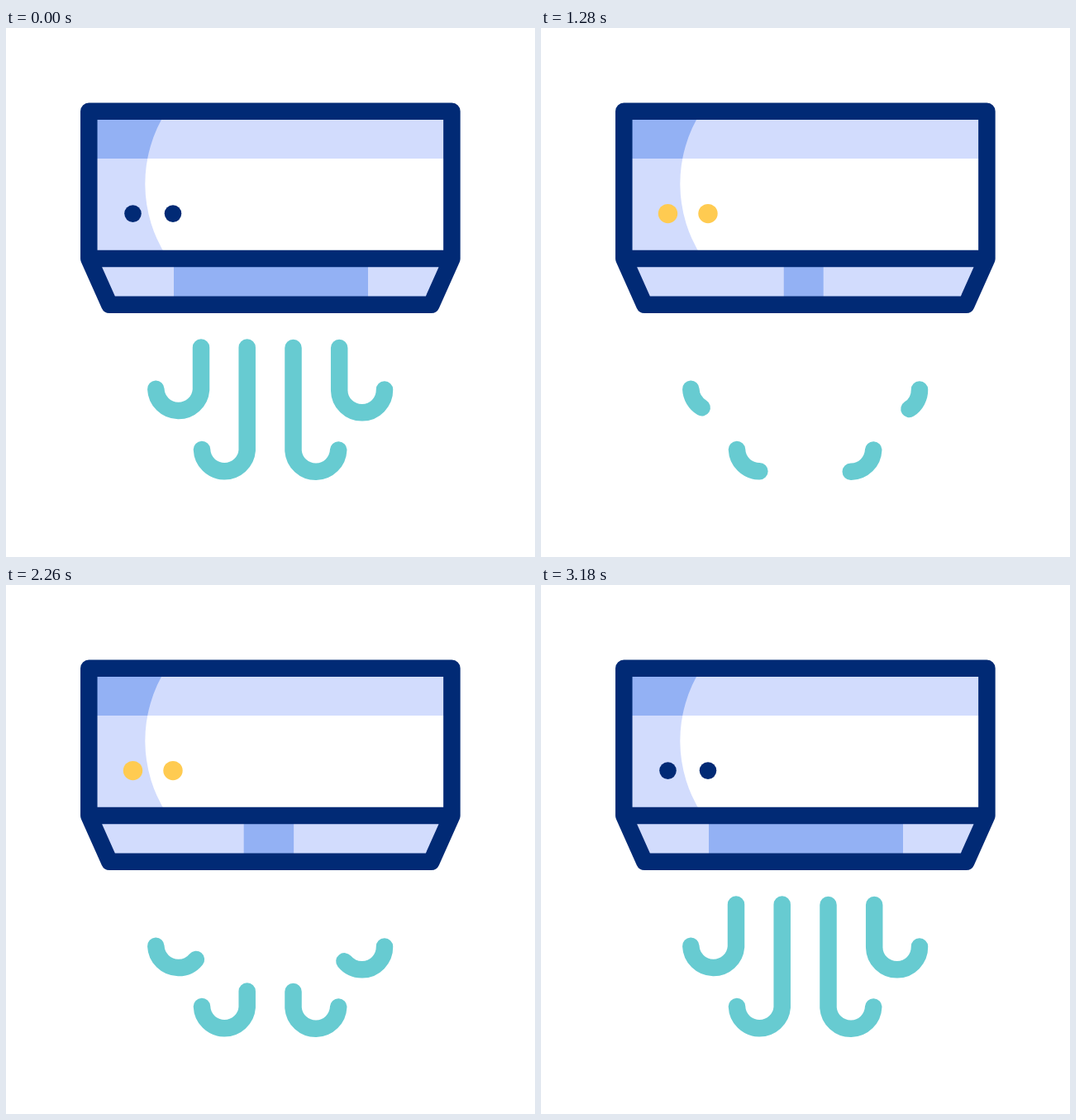
These frames come from a looping animation (640 px wide and 640 px high, 3.6 s). An HTML page:

```html
<!DOCTYPE html>
<html lang="en">
<head>
<meta charset="utf-8">
<title>Air conditioner</title>
<style>
  html, body { margin: 0; height: 100%; overflow: hidden; background: #fff; }
  svg { display: block; width: 100vw; height: 100vh; }
  .light { fill: #d2dcfd; }
  .mid { fill: #93b1f4; }
  .frame { fill: none; stroke: #012a75; stroke-width: 20.5; stroke-linejoin: round; }
  .air { fill: none; stroke: #67cbd1; stroke-width: 20.5; stroke-linecap: round; stroke-dasharray: 1 1; }
</style>
</head>
<body>
<svg viewBox="0 0 640 640">
  <defs>
    <clipPath id="panel"><path d="M100 100H540V279H100Z"/></clipPath>
    <clipPath id="band"><path d="M100 100H540V158H100Z"/></clipPath>
  </defs>

  <path class="light" d="M100 100H540V158H100Z"/>
  <g clip-path="url(#panel)">
    <path id="shade" class="light" d="M100 100H194.5A162.5 162.5 0 0 0 195.9 279H100Z"/>
  </g>
  <use href="#shade" id="corner" clip-path="url(#band)"/>
  <path class="mid" clip-path="url(#band)" d="M100 100H194.5A162.5 162.5 0 0 0 195.9 279H100Z"/>

  <path class="light" d="M100.3 279H539.4L514.5 334.7H125.2Z"/>
  <rect id="vent" class="mid" y="280" height="54"/>
  <path class="frame" d="M100.3 100.7H539.4V279L514.5 334.7H125.2L100.3 279ZM100.3 279H539.4"/>

  <g id="lamps"><circle cx="153.5" cy="224.6"/><circle cx="202" cy="224.6"/></g>

  <g class="air">
    <path pathLength="1" d="M236 386.5V437.7A27.4 27.4 0 0 1 181.3 436.8"/>
    <path pathLength="1" d="M291.7 386.5V511A27.4 27.4 0 0 1 237 510"/>
    <path pathLength="1" d="M347.5 387V511.4A27.4 27.4 0 0 0 402.2 510.5"/>
    <path pathLength="1" d="M403.2 387V438.4A27.4 27.4 0 0 0 458 437.5"/>
  </g>
</svg>
<script>
  const LOOP = 3600;
  // [time, value]: each whole unit of flow empties or refills the streams
  const FLOW = [[700, 0], [1040, .445], [1520, 1.175], [1860, 1.802], [2260, 2.506], [2620, 3.22], [3180, 4]];
  const VENT = [[700, 1], [1228, .19], [1907, 1], [2350, .17], [3180, 1]];
  const LAMPS_ON = [[900, 1620], [2060, 2480]];

  const $ = id => document.getElementById(id);
  const streams = document.querySelector('.air');
  const smooth = u => u * u * (3 - 2 * u);

  // Calls blend(i, u) for the segment that holds t; clamps outside the keys
  function along(keys, t, blend) {
    const last = keys.length - 1;
    if (t <= keys[0][0]) return keys[0][1];
    if (t >= keys[last][0]) return keys[last][1];
    const i = keys.findIndex(k => k[0] > t) - 1;
    return blend(i, (t - keys[i][0]) / (keys[i + 1][0] - keys[i][0]));
  }

  const eased = (keys, t) => along(keys, t, (i, u) =>
    keys[i][1] + (keys[i + 1][1] - keys[i][1]) * smooth(u));

  function slope(keys, i) {
    const a = keys[Math.max(i - 1, 0)], b = keys[Math.min(i + 1, keys.length - 1)];
    return (b[1] - a[1]) / (b[0] - a[0]);
  }

  const spline = (keys, t) => along(keys, t, (i, u) => {
    const [t0, v0] = keys[i], [t1, v1] = keys[i + 1], s = smooth(u), d = t1 - t0;
    return v0 * (1 - s) + v1 * s
      + d * u * (1 - u) * (slope(keys, i) * (1 - u) - slope(keys, i + 1) * u);
  });

  function draw(t) {
    streams.style.strokeDashoffset = -(spline(FLOW, t) % 2);

    const scale = eased(VENT, t);
    $('vent').setAttribute('x', 317 - 114 * scale);
    $('vent').setAttribute('width', 235 * scale);

    const on = LAMPS_ON.some(([a, b]) => t >= a && t < b);
    $('lamps').setAttribute('fill', on ? '#ffcb51' : '#012a75');
    for (const lamp of $('lamps').children) lamp.setAttribute('r', on ? 11.7 : 10.3);
  }

  const start = performance.now();
  function tick() {
    draw((performance.now() - start) % LOOP);
    requestAnimationFrame(tick);
  }
  tick();
</script>
</body>
</html>
```
